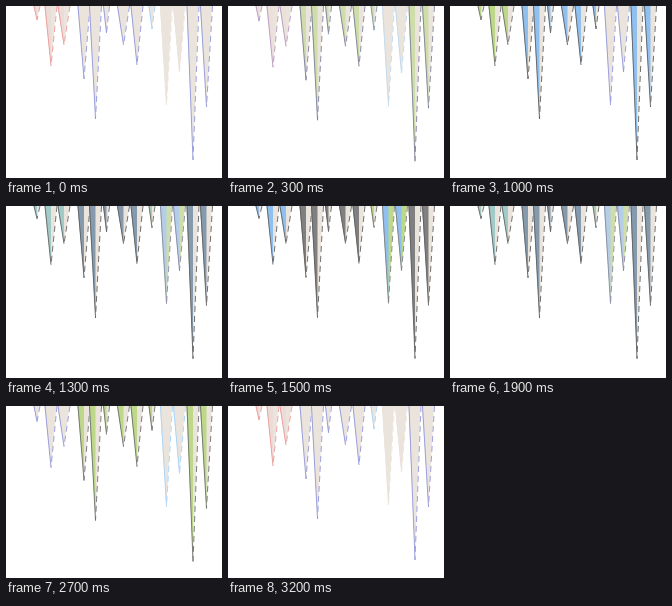
An HTML page with a canvas for the animation above (3300 ms loop, 216x172 px).

```html
<!DOCTYPE html>
<html lang="en">
<head>
<meta charset="utf-8">
<title>Icicles</title>
<style>
html, body { margin: 0; width: 100%; height: 100%; overflow: hidden; background: #fff; }
canvas { display: block; }
</style>
</head>
<body>
<canvas id="stage" width="216" height="172"></canvas>
<script>
const ctx = document.getElementById('stage').getContext('2d');
const STEP = 100, FRAMES = 33, KEY = 500;
const TAN = '#eae4dc', LIME = '#bcd888';

// Each stage of light: left face, right face, rim
const bare = [TAN, TAN, TAN];
const red = ['#ecdcd8', TAN, '#ee9a98'];
const sky = [TAN, TAN, '#a4d4fc'];
const purple = [TAN, TAN, '#9498dc'];
const green = [LIME, TAN, '#707070'];
const blue = ['#90c0f0', TAN, '#606060'];
const gray = ['#808080', TAN, '#606060'];
const split = ['#90c0f0', LIME, '#808080'];

// Stages reached every KEY milliseconds
const early = [red, purple, green, blue];
const main = [purple, green, blue, gray];
const late = [bare, sky, purple, split];
const small = [sky, green, blue, green];

// Stages, tip x, height
const spikes = [
  [early, 31, 14], [early, 45, 60], [early, 58, 39],
  [main, 78, 73], [main, 89.5, 113], [main, 100.5, 27],
  [main, 117.5, 39], [main, 131, 59], [small, 146, 23],
  [late, 160.5, 99], [late, 173.5, 66],
  [main, 187, 154], [main, 200.5, 101]
];

const mix = (a, b, k) => a + (b - a) * k;
const rgb = hex => [1, 3, 5].map(i => parseInt(hex.slice(i, i + 2), 16));
const blend = (a, b, k) => {
  const to = rgb(b);
  return `rgb(${rgb(a).map((v, i) => Math.round(mix(v, to[i], k)))})`;
};

function face(x1, x2, tip, height, color) {
  ctx.fillStyle = color;
  ctx.beginPath();
  ctx.moveTo(x1, 0);
  ctx.lineTo(x2, 0);
  ctx.lineTo(tip, height);
  ctx.fill();
}

function edge(x, tip, height, color, dash) {
  ctx.strokeStyle = color;
  ctx.setLineDash(dash);
  ctx.beginPath();
  ctx.moveTo(x, 0);
  ctx.lineTo(tip, height);
  ctx.stroke();
}

function draw(now) {
  // The sequence runs forward to its middle step and back again
  const n = Math.floor(now / STEP) % FRAMES;
  const phase = Math.min(Math.min(n, FRAMES - 1 - n) * STEP / KEY, 3);
  const i = Math.min(Math.floor(phase), 2), k = phase - i;
  const sway = 1.5 * Math.sin(phase * Math.PI / 2);

  ctx.clearRect(0, 0, 216, 172);
  ctx.lineWidth = 0.9;
  for (const [stages, tip, height] of spikes) {
    const h = height + sway;
    const half = height < 30 ? 3.5 : 6.5;
    const [lit, base, rim] = stages[i].map((c, j) => blend(c, stages[i + 1][j], k));
    face(tip - half, tip + half - 1, tip, h, base);
    face(tip - half, tip, tip, h, lit);
    edge(tip - half + 0.5, tip, h, rim, []);
    edge(tip + half - 0.5, tip, h, rim, [6, 4]);
  }
}

const start = performance.now();
function tick() {
  draw(performance.now() - start);
  requestAnimationFrame(tick);
}
tick();
</script>
</body>
</html>
```
